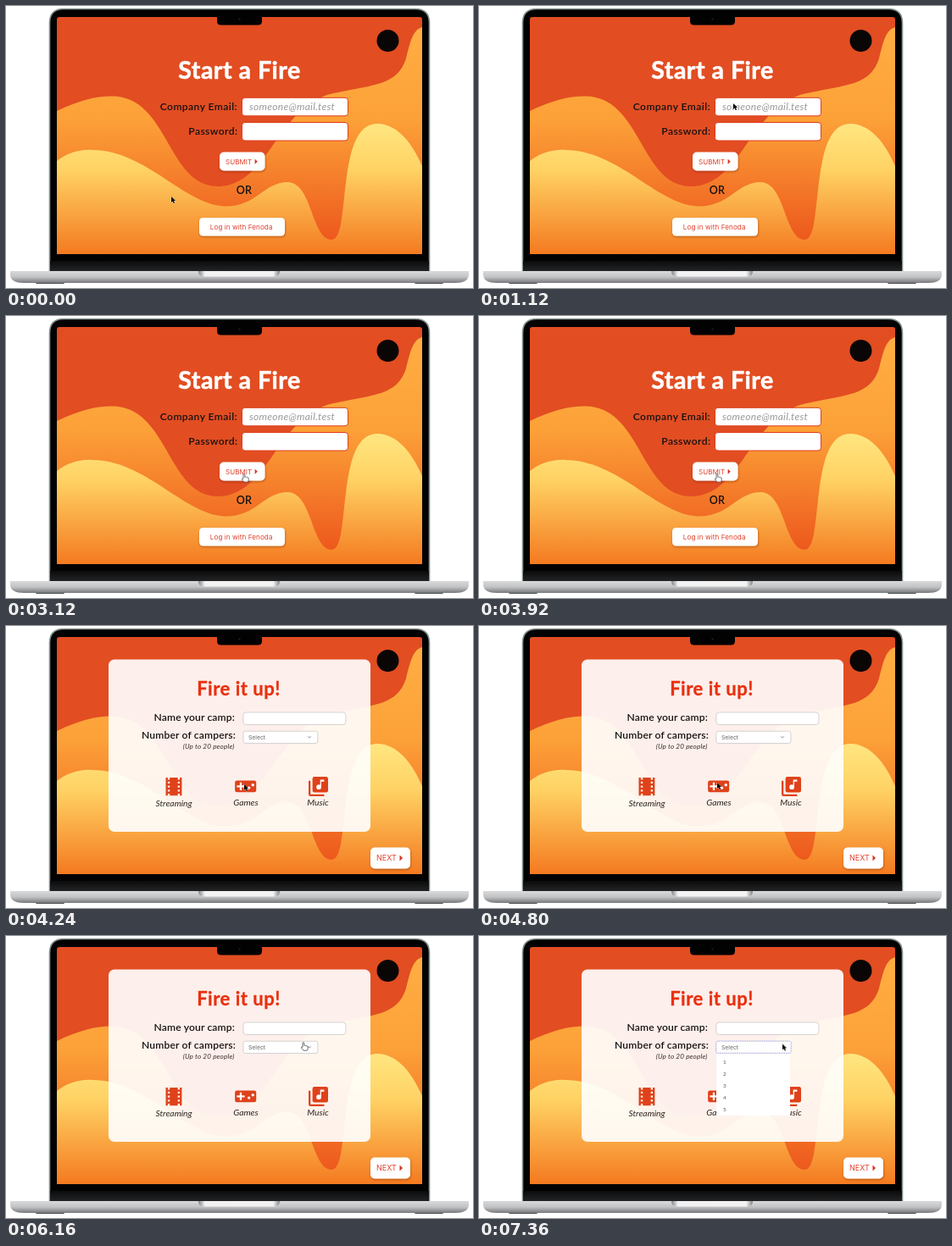
An HTML page that plays this animation: 551x333 px, repeating every 7440 ms.

```html
<!DOCTYPE html>
<html lang="en">
<head>
<meta charset="utf-8">
<title>Campfire sign-in</title>
<style>
  html, body { margin: 0; width: 100%; height: 100%; overflow: hidden; background: #fff; }
  svg { display: block; width: 551px; height: 333px; }
  text { font-family: Lato, "Open Sans", sans-serif; }
  .ui { font-family: Inter, Roboto, sans-serif; fill: #e0402b; }
  .title { font-weight: 700; letter-spacing: .5px; text-anchor: middle; }
  .label { font-size: 12.1px; font-weight: 600; text-anchor: end; letter-spacing: .15px; fill: #141110; }
  .wide { letter-spacing: .42px; }
  .caption { font-size: 10.3px; font-style: italic; text-anchor: middle; fill: #2b2220; }
  .field { fill: #fff; stroke: #dd3c1c; }
  .plain { fill: #fff; stroke: #ccc8c8; stroke-width: .8; }
  .button { fill: #fff; filter: url(#shadow); }
  .option { font-size: 6.4px; fill: #555; }
  .icon { fill: #df421b; }

  /* One loop is 7440 ms */
  .switch { animation: 7440ms step-end infinite; }
  #login { animation-name: login; }
  #camp { animation-name: camp; }
  #list { animation-name: list; }
  #arrow { animation-name: arrow; }
  #hand { animation-name: hand; }
  #pointer { animation: move 7440ms ease-in-out infinite; }

  @keyframes login { 0% { opacity: 1 } 57%, 100% { opacity: 0 } }
  @keyframes camp { 0% { opacity: 0 } 57%, 100% { opacity: 1 } }
  @keyframes list { 0% { opacity: 0 } 88.2%, 100% { opacity: 1 } }
  @keyframes arrow {
    0% { opacity: 1 } 26.9% { opacity: 0 } 57% { opacity: 1 }
    77.4% { opacity: 0 } 88.2%, 100% { opacity: 1 }
  }
  @keyframes hand {
    0% { opacity: 0 } 26.9% { opacity: 1 } 57% { opacity: 0 }
    77.4% { opacity: 1 } 88.2%, 100% { opacity: 0 }
  }
  @keyframes move {
    0%, 3.2% { transform: translate(195px, 225px) }
    12.1%, 19.4% { transform: translate(300px, 115px) }
    28.2%, 31.2% { transform: translate(276px, 186.8px) }
    41.7%, 57.8% { transform: translate(281px, 186.8px) }
    64.5%, 69.9% { transform: translate(281px, 185px) }
    79.3%, 84.7% { transform: translate(351px, 126px) }
    91.4%, 100% { transform: translate(358px, 127.5px) }
  }
</style>
</head>
<body>
<svg viewBox="0 0 551 333">
  <defs>
    <linearGradient id="orange" gradientUnits="userSpaceOnUse" x1="0" y1="25" x2="0" y2="285">
      <stop offset="0" stop-color="#ffae43"/>
      <stop offset=".42" stop-color="#fca138"/>
      <stop offset="1" stop-color="#ec541b"/>
    </linearGradient>
    <linearGradient id="yellow" gradientUnits="userSpaceOnUse" x1="0" y1="139" x2="0" y2="293">
      <stop offset="0" stop-color="#ffe680"/>
      <stop offset=".35" stop-color="#ffd264"/>
      <stop offset="1" stop-color="#f47a20"/>
    </linearGradient>
    <linearGradient id="hinge" x2="0" y2="1">
      <stop offset="0" stop-color="#0b0b0c"/>
      <stop offset="1" stop-color="#232425"/>
    </linearGradient>
    <linearGradient id="metal" x2="0" y2="1">
      <stop offset="0" stop-color="#d9dadb"/>
      <stop offset=".5" stop-color="#c2c3c5"/>
      <stop offset="1" stop-color="#77787b"/>
    </linearGradient>
    <linearGradient id="dent">
      <stop offset="0" stop-color="#808184"/>
      <stop offset=".08" stop-color="#f2f2f3"/>
      <stop offset=".92" stop-color="#f2f2f3"/>
      <stop offset="1" stop-color="#808184"/>
    </linearGradient>
    <filter id="shadow" x="-10%" y="-20%" width="120%" height="150%">
      <feDropShadow dx=".5" dy="1.2" stdDeviation=".9" flood-color="#551800" flood-opacity=".4"/>
    </filter>
    <clipPath id="screen"><path d="M60 293V16Q60 13 63 13H488Q491 13 491 16V293Z"/></clipPath>
  </defs>

  <!-- Laptop -->
  <path d="M51.5 313V20Q51.5 3.5 68 3.5H483Q499.5 3.5 499.5 20V313Z" fill="#020203" stroke="#84908e" stroke-width="1.6"/>
  <rect x="52" y="301" width="447" height="12" fill="url(#hinge)"/>
  <g fill="#4a4b4d">
    <rect x="35" y="325" width="34" height="3" rx="1.5"/>
    <rect x="482" y="325" width="34" height="3" rx="1.5"/>
  </g>
  <path d="M5 313H546V318Q545 327 530 327H21Q6 327 5 318Z" fill="url(#metal)"/>
  <path d="M227 313H323Q323 319.5 316 319.5H234Q227 319.5 227 313Z" fill="url(#dent)"/>

  <!-- Screen -->
  <g clip-path="url(#screen)">
    <rect x="60" y="13" width="431" height="280" fill="#e24d22"/>
    <path fill="url(#orange)" d="M60 124C85 112 105 106.5 125 106.5C192 106.5 190 213 250 213C312 213 320 112 392 102C432 93 462 94 472 62C477 42 480 28 491 25V293H60Z"/>
    <path fill="url(#yellow)" d="M60 183C72 174 86 169 102 170C165 170 212 236.5 260 236.5C295 236.5 305 208 332 208C362 208 360 276 384 276C408 276 388 139 438 139C462 139 480 163 491 189V293H60Z"/>

    <g id="login" class="switch">
      <text class="title" x="275.5" y="86" font-size="28.5" fill="#fff" stroke="#fff" stroke-width=".6">Start a Fire</text>
      <text class="label wide" x="273" y="123">Company Email:</text>
      <text class="label wide" x="273.5" y="152">Password:</text>
      <rect class="field" x="278.5" y="108.3" width="125" height="21.5" rx="3.5"/>
      <rect class="field" x="278.5" y="137.5" width="125" height="21.5" rx="3.5"/>
      <text x="287" y="123" font-size="12" font-style="italic" letter-spacing=".28" fill="#999">someone@mail.test</text>
      <rect class="button" x="252" y="172.5" width="53.5" height="22" rx="5"/>
      <text class="ui" x="259" y="186.7" font-size="8.1">SUBMIT</text>
      <path d="M293.6 180.6L296.7 183.7L293.6 186.8Z" fill="#d9311f"/>
      <text class="label" x="290" y="221.5" style="font-size:12.5px">OR</text>
      <rect class="button" x="228" y="250" width="101" height="21.5" rx="4.5"/>
      <text class="ui" x="240.8" y="263.8" font-size="8.1" letter-spacing=".08">Log in with Fenoda</text>
    </g>

    <g id="camp" class="switch" opacity="0">
      <rect x="121" y="39.5" width="309" height="203.5" rx="7" fill="#fff" fill-opacity=".91"/>
      <text class="title" x="274.5" y="81.5" font-size="22" fill="#e9300f" stroke="#e9300f" stroke-width=".3">Fire it up!</text>
      <text class="label" x="270" y="111.5">Name your camp:</text>
      <text class="label" x="271" y="132.5">Number of campers:</text>
      <text x="269.5" y="145" font-size="8.2" font-style="italic" letter-spacing=".12" text-anchor="end" fill="#3a302e">(Up to 20 people)</text>
      <rect class="plain" x="279.9" y="102" width="121" height="14.5" rx="3.5"/>
      <rect class="plain" x="279.9" y="124.2" width="88" height="14.3" rx="2.5"/>
      <path d="M356.2 130.3L358 132.2L359.8 130.3" fill="none" stroke="#777" stroke-width=".8"/>

      <g class="icon" fill-rule="evenodd">
        <path transform="translate(183.8 175.5) scale(1.18)" d="M4 3h2v2h2V3h8v2h2V3h2v18h-2v-2h-2v2H8v-2H6v2H4ZM6 7v2h2V7ZM6 11v2h2v-2ZM6 15v2h2v-2ZM16 7v2h2V7ZM16 11v2h2v-2ZM16 15v2h2v-2Z"/>
        <g transform="translate(269 175.7) scale(1.14)">
          <rect x="1" y="6" width="22" height="12" rx="2"/>
          <path d="M3 12H11M7 8V16" stroke="#fff" stroke-width="2"/>
          <circle cx="15.5" cy="13.5" r="1.5" fill="#fff"/>
          <circle cx="19.5" cy="10.5" r="1.5" fill="#fff"/>
        </g>
        <g transform="translate(354.7 175.8) scale(1.15)">
          <rect x="6" y="2" width="16" height="16" rx="2"/>
          <path d="M2 6H4V20H18V22H4Q2 22 2 20Z"/>
          <circle cx="12.5" cy="12.5" r="2.5" fill="#fff"/>
          <path d="M13.9 12.5V5H18V7H15V12.5Z" fill="#fff"/>
        </g>
      </g>
      <text class="caption" x="198" y="212.5">Streaming</text>
      <text class="caption" x="283" y="211.5">Games</text>
      <text class="caption" x="368" y="211.5">Music</text>
      <rect class="button" x="430" y="261.5" width="47" height="25" rx="5"/>
      <text class="ui" x="437" y="277.2" font-size="9">NEXT</text>
      <path d="M464.5 270.5L468 274L464.5 277.5Z" fill="#d9311f"/>

      <g id="list" class="switch" opacity="0">
        <rect x="280" y="138.5" width="87" height="73.5" fill="#fff" filter="drop-shadow(0 .5px .7px #0003)"/>
        <rect x="279.9" y="124.2" width="88.3" height="14" rx="1" fill="#fff" stroke="#a6a8ec" stroke-width=".9" stroke-dasharray="1.5 1"/>
        <g class="ui">
          <text class="option" x="288" y="150.6">1</text>
          <text class="option" x="288" y="164.7">2</text>
          <text class="option" x="288" y="178.8">3</text>
          <text class="option" x="288" y="192.9">4</text>
          <text class="option" x="288" y="207">5</text>
        </g>
      </g>
      <text class="ui" x="286" y="133.8" font-size="6.8" style="fill:#666">Select</text>
    </g>

    <circle cx="450.5" cy="41" r="13" fill="#0a0605"/>
  </g>
  <path d="M249 12H302V18Q302 22.5 297 22.5H254Q249 22.5 249 18Z" fill="#020203"/>
  <circle cx="275.5" cy="15.5" r="1.2" fill="#171a2c"/>

  <g id="pointer">
    <path id="arrow" class="switch" d="M0 0V7L1.6 5.6L2.8 8.1L4.1 7.5L3 5.1H5.1Z" fill="#080808" stroke="#fff" stroke-width=".7" paint-order="stroke"/>
    <path id="hand" class="switch" opacity="0" d="M-1 5.3V.6Q-1-.4-.1-.4T.8.6V3.4Q2 2.7 2.5 3.6Q3.6 3 4 4Q5.2 3.7 5.2 5V6.5Q5.2 8 4.3 9.2H0Q-1.4 7.6-2.7 5.9Q-2.6 4.6-1 5.3Z" fill="#fff" stroke="#333" stroke-width=".7"/>
  </g>
</svg>
</body>
</html>
```
